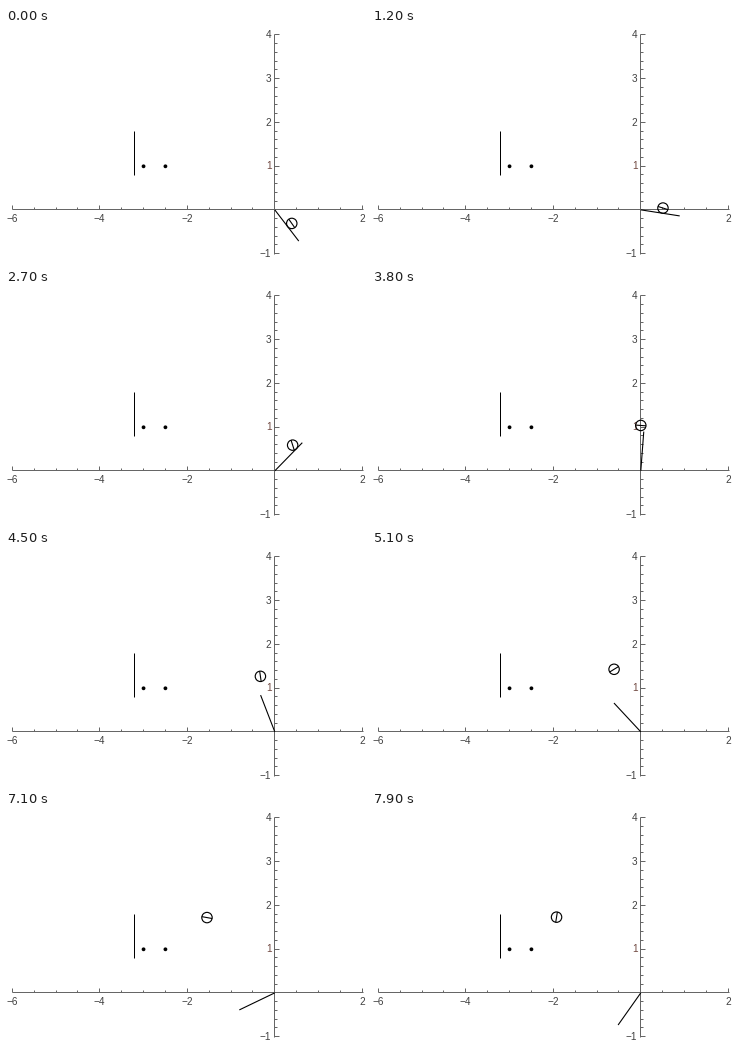
Animation, 360 px wide and 233 px high, one loop 8 s. Source, as a matplotlib script:

```python
import numpy as np
import matplotlib.pyplot as plt
from matplotlib.animation import FuncAnimation
from matplotlib.patches import Circle

W, H, DPI = 360, 233, 100
FRAMES, STEP = 80, 100
OX, OY, UNIT = 268.8, 181.85, 43.75   # origin and scale in pixels
GRAY, INK = "#666666", "#404040"
PX = 72 / DPI

ROD, R = 0.9 * UNIT, 5.2
SPIN = 2 * np.pi / 99                # rod turn per frame
START = np.radians(-52.5)
RELEASE = 34                         # ball leaves the rod here

fig = plt.figure(figsize=(W / DPI, H / DPI), dpi=DPI, facecolor="white")
ax = fig.add_axes([0, 0, 1, 1])
ax.set_xlim(0, W)
ax.set_ylim(H, 0)
ax.axis("off")


def line(x, y, color="black", width=1.0):
    return ax.plot(x, y, color=color, lw=width * PX, solid_capstyle="butt")[0]


def crisp(x, y, color=GRAY):
    """Straight line filling the pixel row or column that holds it."""
    line(np.floor(x), np.floor(y), color)


def label(x, y, value, ha, color=INK):
    ax.text(x, y, str(value).replace("-", "\u2212"), ha=ha, va="baseline",
            family="Liberation Sans", size=10 * PX, color=color)


def px(x):
    return OX + x * UNIT


def py(y):
    return OY - y * UNIT


def draw_axes():
    crisp([px(-6), px(2) + 1], [OY, OY])
    crisp([OX, OX], [py(-1) + 1, py(4)])
    for i in range(-12, 5):
        major = i % 4 == 0
        x = px(i / 2)
        crisp([x, x], [OY, OY - (4 if major else 2)])
        if major and i:
            label(x - 0.3, 194.2, i // 2, "center")
    for i in range(-5, 21):
        major = i % 5 == 0
        y = py(i / 5)
        crisp([OX, OX + (5 if major else 3)], [y, y])
        if major and i:
            label(265.5, y + 3.2, i // 5, "right",
                  "#704840" if i == 5 else INK)


def draw_target():
    crisp([px(-3.2)] * 2, [py(0.8) + 1, py(1.8)], "black")
    for x in (-3, -2.5):
        ax.add_patch(Circle((px(x), py(1) + 0.2), 1.9, fc="black", lw=0))


def ball_state(n):
    """Ball centre relative to the pivot (y up) and its turn."""
    if n < RELEASE:
        a = START + SPIN * n
        slide = 0.0213 * n * (n - 10)
        s = 21.1 + slide
        x = s * np.cos(a) - R * np.sin(a)
        y = s * np.sin(a) + R * np.cos(a)
        return x, y, np.radians(-55) + SPIN * n - slide / 4.85
    k = n - 38
    return (-2.055 * k, 45.4 + 1.59 * k - 0.02075 * k * k,
            np.radians(-4 - 11.1 * k))


draw_axes()
draw_target()
rod = line([], [], width=1.1)
ball = ax.add_patch(Circle((0, 0), R, fill=False, ec="black", lw=1.15 * PX,
                           zorder=3))
mark = line([], [], width=1.1)


def update(n):
    a = START + SPIN * n
    rod.set_data([OX, OX + ROD * np.cos(a)], [OY, OY - ROD * np.sin(a)])
    x, y, turn = ball_state(n)
    cx, cy = OX + x, OY - y
    ball.center = cx, cy
    dx, dy = R * np.cos(turn), R * np.sin(turn)
    mark.set_data([cx - dx, cx + dx], [cy + dy, cy - dy])
    return rod, ball, mark


anim = FuncAnimation(fig, update, frames=FRAMES, interval=STEP, repeat=True,
                     repeat_delay=0, init_func=lambda: update(0))
plt.show()
```
